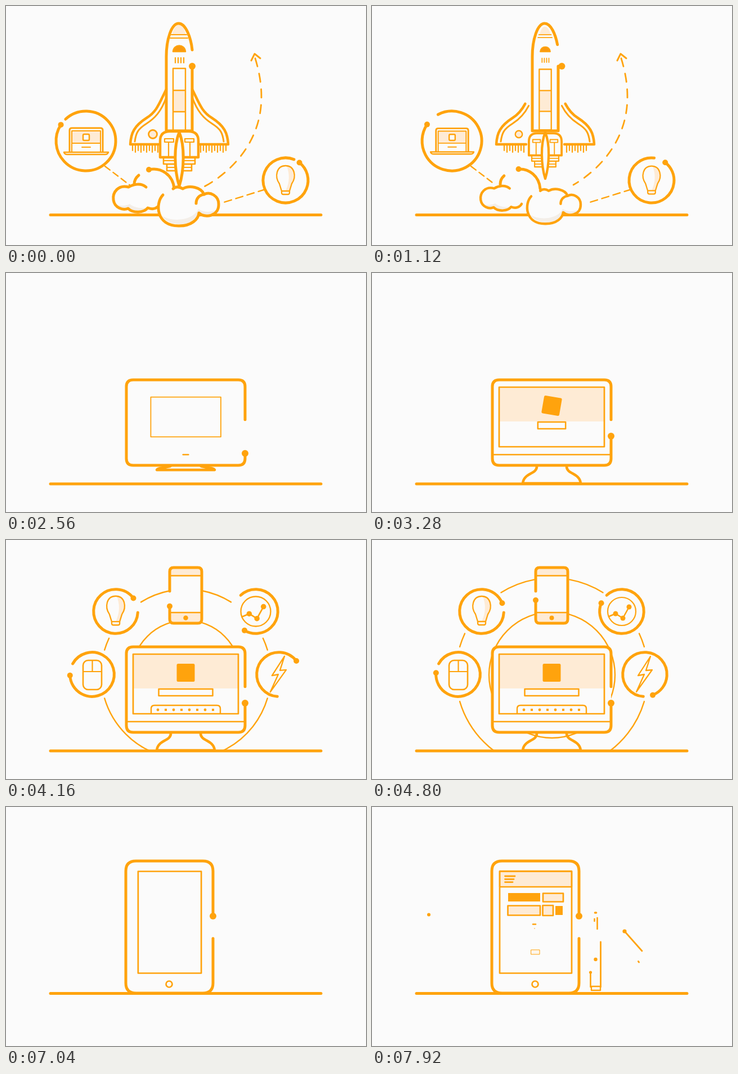
An HTML page with a canvas that plays this animation: 640 px wide and 425 px high, repeating every 8000 ms.

```html
<!DOCTYPE html>
<html lang="en">
<head>
<meta charset="utf-8">
<title>Launch line animation</title>
<style>
html,body{margin:0;width:100%;height:100%;overflow:hidden;background:#fbfbfb}
canvas{display:block;width:640px;height:425px}
</style>
</head>
<body>
<canvas id="stage"></canvas>
<script>
const LOOP = 8000, INK = '#ffa30d', PALE = '#feebd5', PAPER = '#fbfbfb', SHADE = '#f3eee8';
const cv = document.getElementById('stage'), c = cv.getContext('2d');
const dpr = window.devicePixelRatio || 1;
cv.width = 640 * dpr;
cv.height = 425 * dpr;

// ---- timing ----
const ease = {
  io: p => p < .5 ? 2 * p * p : 1 - 2 * (1 - p) ** 2,
  in: p => p * p,
  out: p => 1 - (1 - p) ** 2,
  back: p => 1 + 2.4 * (p - 1) ** 3 + 1.4 * (p - 1) ** 2
};
let now = 0;
// steps: [time, value, easing into this step]
function key(...steps) {
  if (now <= steps[0][0]) return steps[0][1];
  for (let i = 1; i < steps.length; i++) {
    const [t0, v0] = steps[i - 1], [t1, v1, e = 'io'] = steps[i];
    if (now < t1) return v0 + (v1 - v0) * ease[e]((now - t0) / (t1 - t0));
  }
  return steps[steps.length - 1][1];
}
const pop = (t, d = 300) => key([t, 0], [t + d, 1, 'back']);

// ---- drawing helpers ----
const paths = {};
function geo(d) {
  if (!paths[d]) {
    const el = document.createElementNS('http://www.w3.org/2000/svg', 'path');
    el.setAttribute('d', d);
    paths[d] = { el, p: new Path2D(d), len: el.getTotalLength() };
  }
  return paths[d];
}
const len = d => geo(d).len;

function paint(p, w, fill) {
  if (fill) { c.fillStyle = fill; c.fill(p); }
  if (w) { c.lineWidth = w; c.stroke(p); }
}
const line = (d, w, fill) => paint(geo(d).p, w, fill);
function trim(d, a, b, w) {
  if (b - a < .1) return;
  c.setLineDash([b - a, 1e5]);
  c.lineDashOffset = -a;
  line(d, w);
  c.setLineDash([]);
}
function dashes(d, b, on, off, w) {
  for (let s = 0; s < b; s += on + off) trim(d, s, Math.min(s + on, b), w);
}
function circle(x, y, r, w, fill) {
  if (r <= 0) return;
  const p = new Path2D();
  p.arc(x, y, r, 0, 7);
  paint(p, w, fill);
}
const dot = (x, y, r) => circle(x, y, r, 0, INK);
function box(x0, y0, x1, y1, w, fill, r = 0) {
  const p = new Path2D();
  p.roundRect(x0, y0, x1 - x0, y1 - y0, r);
  paint(p, w, fill);
}
function at(x, y, sx, draw, sy = sx, rot = 0) {
  if (sx < .01 || sy < .01) return;
  c.save();
  c.translate(x, y);
  c.rotate(rot);
  c.scale(sx, sy);
  c.translate(-x, -y);
  draw();
  c.restore();
}
function ring(x, y, r, from, to, w = 5) {
  if (Math.abs(to - from) < 1) return;
  const k = Math.PI / 180;
  c.beginPath();
  c.arc(x, y, r, from * k, to * k, to < from);
  c.lineWidth = w;
  c.stroke();
}
function orbit(x, y, r, from, to) {
  if (Math.abs(to - from) < 1) return;
  ring(x, y, r, from, to);
  const a = to * Math.PI / 180;
  dot(x + r * Math.cos(a), y + r * Math.sin(a), 5);
}

// ---- the one long line: rocket hull, monitor, tablet ----
const hull = 'M331 78C329 58 320 31 307 31C294 31 285 60 285 90V222H331';
const hullEnd = hull + 'V107';
const bend = hullEnd + 'H368V261H380';
const toMonitor = bend + 'H425';
const monitor = toMonitor + 'V202Q425 190 413 190H226Q214 190 214 202V330Q214 342 226 342H413Q425 342 425 330V290';
const toTablet = monitor + 'V233H368';
const tablet = toTablet + 'V313Q368 331 350 331H231Q213 331 213 313V114Q213 96 231 96H350Q368 96 368 114V194';

function longLine() {
  const head = key([1000, len(hullEnd)], [1680, len(bend), 'in'], [2790, len(monitor), 'out'],
    [5840, len(monitor)], [6900, len(tablet)]);
  const tail = key([1000, 0], [1680, len(hull) + 4, 'in'], [2500, len(toMonitor), 'out'],
    [5840, len(toMonitor)], [6760, len(toTablet)]);
  trim(tablet, tail, head, 5);
  const p = geo(tablet).el.getPointAtLength(head);
  dot(p.x, p.y, 6);
}

function ground() {
  const y = key([1840, 371.5], [2400, 375], [5800, 375], [6480, 331.5]);
  line(`M79 ${y.toFixed(1)}H560`, 5);
}

// ---- icons ----
function bulb() {
  line('M497 284C513 284 517 303 508 316L504 329H490L486 316C477 303 481 284 497 284', 0, PAPER);
  line('M499 284C513 285 517 303 508 316L504 329H497C505 312 504 298 499 284', 0, PALE);
  line('M490 329L486 316C477 303 481 284 497 284C513 284 517 303 508 316L504 329Z', 2.3);
  line('M490 329V332Q490 335 493 335H501Q504 335 504 332V329', 2.3);
}
function laptop() {
  box(117, 221, 168, 244, 0, PALE);
  line('M113 259V221Q113 217 117 217H168Q172 217 172 221V259', 3);
  line('M117 259V222H168V259M117 244H168M135 251H150', 2);
  box(137, 228, 148, 239, 2.5, PAPER, 2);
  line('M103 260H182Q181 264 176 264H109Q104 264 103 260Z', 2.5);
}
function mouse() {
  box(137, 214, 170, 266, 2.6, null, 9);
  line('M137 234H170M153.5 214V234', 2.2);
}
function chart() {
  circle(444, 127, 25, 2.2);
  line('M421 136L433 131L446 139L457 119', 2.5);
  dot(433, 131, 4.5);
  dot(446, 139, 4.5);
  dot(457, 119, 4.5);
}
const bolt = () => line('M495 207L473 241L484 239L470 270L498 231L487 232Z', 2.3);

// ---- rocket scene ----
const wing = 'M285 148C272 174 268 188 250 199C228 213 222 226 221 246H274';
const rib = 'M285 162C276 188 264 200 250 209C234 219 231 226 229 241';
const swirl = 'M299 325C297 300 275 286 254 291';
const route = 'M443 93C450 116 454 138 454 160C455 245 395 300 347 324';

function halfWing(left) {
  const out = key([960, 0], [1520, 1]);
  for (const [d, w] of [[wing, 4.5], [rib, 3]]) trim(d, len(d) * out, len(d), w);
  const n = Math.round(10 * (1 - out));
  for (let i = 0; i < n; i++) line(`M${270 - i * 5} 248V${i % 2 ? 257 : 260}`, 2.2);
  if (left) at(261, 228, 1 - out, () => circle(261, 228, 7.5, 2.8, PALE));
}
function engine() {
  box(286, 281, 330, 293, 2.6, PAPER);
  box(280, 269, 336, 281, 2.6, PAPER);
  line('M274 269V240Q274 223 291 223H325Q342 223 342 240V269Z', 4.5, PAPER);
  line('M282 236H298V242H282ZM318 236H334V242H318ZM289 242V269M327 242V269M281 275H335M287 287H329', 2.2);
}
function cloudLeft() {
  line('M250 322C240 314 226 317 218 322C200 317 189 331 191 345C193 359 208 364 217 360C226 369 245 368 252 359C262 363 270 359 273 353L285 335Z', 0, PAPER);
  line('M196 353C204 363 212 361 217 359C226 368 245 367 252 359C240 360 228 359 220 352C212 356 204 356 196 353', 0, SHADE);
  line('M249 322C240 314 226 317 218 322C200 317 189 331 191 345C193 359 208 364 217 360C226 369 245 368 252 359C262 363 270 359 273 353', 5);
}
function cloudRight() {
  const edge = 'M279 336C265 350 266 392 308 391C330 391 342 379 343 368C353 378 379 374 378 352C378 338 363 329 352 335C347 322 326 318 314 325C308 321 302 321 297 325';
  line(edge, 0, PAPER);
  line('M277 373C286 390 330 398 342 368C352 377 371 374 376 361C365 368 350 367 342 361C334 380 298 386 277 373', 0, SHADE);
  line(edge, 5);
  line('M338 351C338 342 344 336 352 335', 5);
}
function rocketBack() {
  const out = key([960, 0], [1680, 1, 'in']);
  dashes(route, len(route) + (16 - len(route)) * out - key([1680, 0], [1840, 16]), 15, 13, 2.8);
  at(442, 88, key([1840, 1], [2100, 0]), () => line('M436 97L442 85L452 93', 3));
  const link = 'M461 326L381 351', cord = 'M176 285L222 320';
  dashes(link, len(link) + (9 - len(link)) * out - key([1680, 0], [1800, 9]), 13, 8, 2.4);
  dashes(cord, len(cord) * (1 - key([960, 0], [1500, 1])), 11, 7, 2.4);
}
function rocketBody() {
  const gone = key([960, 1], [1480, 0]);
  halfWing(true);
  at(308, 0, 1, () => {
    c.translate(616, 0);
    c.scale(-1, 1);
    halfWing(false);
  });
  at(308, 52, gone, () => {
    line('M295 51C299 38 303 33 307 33C312 33 317 39 320 51Z', 0, PALE);
    line('M294 51H321M292 57H323', 2.2);
  });
  at(308, 82, gone, () => line('M297 81C298 67 318 67 319 81Z', 2.5, '#f99a10'));
  at(308, 97, gone, () => line('M301 92V101M306 92V101M311 92V101M316 92V101', 2.2));
  at(308, 166, key([1000, 1], [1740, 0, 'in']), () => {
    box(297, 150, 319, 188, 0, PALE);
    line('M297 111H319V222H297ZM297 150H319M297 188H319', 2.4);
  });
}
function rocketFront() {
  const s = key([960, 1], [1560, 0]), beat = Math.sin(now / 130);
  at(308, 246, s, engine);
  at(308, 224, s, () => line('M308 225C298 248 299 292 308 320C317 292 318 248 308 225Z', 5, PAPER), s * (1 + .015 * beat));
  const puff = key([980, 1], [1600, 0]), breath = 1 + .012 * Math.sin(now / 210);
  trim(swirl, 0, len(swirl) * puff, 5);
  if (puff > .02) {
    const p = geo(swirl).el.getPointAtLength(len(swirl) * puff);
    dot(p.x, p.y, 5 * Math.min(1, puff * 2));
  }
  trim('M228 317C228 310 231 305 236 301', 0, 19 * puff, 5);
  at(211, 343, puff * breath, cloudLeft);
  at(315, 358, puff * breath, cloudRight);
  if (now > 1400) circle(211, 343, key([1400, 14], [1680, 8.5], [1790, 0]), 2.4);
}
function rocketBadges() {
  const s = key([1000, 1], [1740, 0, 'in']);
  const tail = key([960, 0], [1680, 307, 'in'], [1820, 361, 'out']);
  const head = key([960, 0], [1680, 14, 'in'], [1820, 15]);
  orbit(142, 240, 53, 227 + tail, 573 + head);
  orbit(497, 310, 40, -68 - tail, -412 - head);
  at(142, 239, s, laptop);
  at(497, 309, s, bulb);
}

// ---- monitor scene ----
const shrink = () => key([5320, 1], [6300, 0]);
const phone = 'M291 91V56Q291 49 298 49H341Q348 49 348 56V141Q348 148 341 148H298Q291 148 291 141V107';
const gaps = [[0, 16.5], [180, 16.5], [221.5, 16.5], [270, 10.5], [318.5, 16.5], [360, 16.5]];

function halos() {
  const grow = key([3700, 0], [4400, 1, 'out']), fade = key([5760, 1], [6240, 0, 'in']);
  if (grow * fade < .02) return;
  const open = key([5300, 1], [5740, 0]);
  const w = key([5300, 2.4], [5760, 3.4]);
  c.save();
  c.beginPath();
  c.rect(0, 0, 640, 375);
  c.clip();
  const big = key([5280, 171], [5760, 219, 'out']) * grow * fade;
  for (let i = 1; i < gaps.length; i++) {
    const [a, ha] = gaps[i - 1], [b, hb] = gaps[i];
    ring(320, 238.5, big, a + ha * open, b - hb * open, w);
  }
  circle(320, key([4800, 240], [5760, 237.5]), key([4400, 110], [4800, 112], [5760, 136]) * grow * fade, w);
  c.restore();
}
function stand() {
  const k = key([2500, 0], [2950, 1, 'out'], [5320, 1], [5760, .3], [5960, 0]);
  if (k < .02) return;
  const y = v => (342 + (v - 342) * k).toFixed(1);
  paint(new Path2D(`M293 ${y(344)}C293 ${y(358)} 270 ${y(355)} 268 ${y(374)}H371C369 ${y(355)} 346 ${y(358)} 346 ${y(344)}`), 4.6);
}
function keyboard() {
  const dy = key([3500, 18], [3900, 0, 'out'], [5320, 0], [5760, 7], [6100, 18]);
  if (dy > 17) return;
  c.save();
  c.beginPath();
  c.rect(227, 204, 185, 105);
  c.clip();
  c.translate(0, dy);
  line('M258 312V300Q258 294 264 294H375Q381 294 381 300V312', 2.4);
  for (let i = 0; i < 8; i++) {
    const x = 270 + i * 14;
    if (i % 2) box(x - 2, 300, x + 2, 304, 0, INK);
    else dot(x, 302, 2.4);
  }
  c.restore();
}
function screen() {
  if (now > 2600 && now < 6000) box(214, 190, 425, 342, 0, PAPER, 12);
  const k = key([2350, 0], [2850, 1, 'out'], [5860, 1], [6320, 0]);
  at(320, 256, k, () => {
    const h = key([2700, 0], [3120, 61]);
    box(226, 203, 413, 203 + h, 0, PALE);
    box(226, 203, 413, 309, 2.7);
  });
  const chin = 105 * key([2500, 0], [2900, 1], [5840, 1], [6240, 0]);
  if (chin > 1) line(`M${319.5 - chin} 323H${319.5 + chin}`, 2.5);
  const out = shrink();
  at(319.5, 236, key([2900, 0], [3200, 1, 'back']) * out, () => box(303.5, 220, 335.5, 252, 0, INK, 2.5),
    undefined, key([2900, -1.6], [3280, .17], [3460, 0]));
  const wide = key([3080, 0], [3280, .51], [3520, 1, 'out']);
  at(319.5, 271, out, () => {
    if (wide > .01) box(319.5 - 48 * wide, 265, 319.5 + 48 * wide, 277, 2.5, PAPER);
  });
  keyboard();
}
function phoneScene() {
  const L = len(phone);
  const b = L * key([3600, 0], [4250, 1]);
  const a = key([5320, 0], [5760, 79, 'in'], [6300, L]);
  if (now > 3900 && now < 5900) box(291, 49, 348, 148, 0, PAPER, 7);
  const s = pop(3950, 350) * shrink();
  at(319.5, 58, s, () => box(293, 51, 346, 63, 0, PALE));
  at(319.5, 64, s, () => line('M293 63.5H346', 2.4));
  at(319.5, 138, s, () => box(293, 130, 346, 146, 0, PALE));
  at(319.5, 129, s, () => line('M293 129H346', 2.4));
  at(319.5, 138.5, s, () => dot(319.5, 138.5, 4));
  if (b - a < .5) return;
  trim(phone, a, b, 5);
  const p = geo(phone).el.getPointAtLength(b);
  dot(p.x, p.y, 5);
}
function badge(x, y, start, begin, icon, dx = 0, dy = 0) {
  const tail = key([5320, 0], [5760, 108, 'in'], [6300, 355, 'out']);
  const head = key([begin, 0], [begin + 800, 335], [5320, 335], [5760, 347], [6300, 355]);
  orbit(x, y, 39.3, start + tail, start + head);
  at(x, y, pop(begin + 300, 420) * shrink(), () => {
    c.translate(dx, dy);
    icon();
  });
}
function monitorScene() {
  halos();
  stand();
  screen();
  phoneScene();
  badge(153, 239, 209, 3440, mouse);
  badge(195, 127, 3, 3480, bulb, -302, -184);
  badge(444, 127, 227, 3640, chart);
  badge(485, 239, 94, 3680, bolt);
}

// ---- tablet scene ----
function stretch(x0, y0, x1, y1, t, w, fill) {
  at((x0 + x1) / 2, (y0 + y1) / 2, pop(t, 260), () => box(x0, y0, x1, y1, w, fill));
}
function draw(x0, y0, x1, y1, t, w = 2.6, d = 260) {
  const k = key([t, 0], [t + d, 1, 'out']);
  if (k > .01) line(`M${x0} ${y0}L${x0 + (x1 - x0) * k} ${y0 + (y1 - y0) * k}`, w);
}
function tabletScene() {
  const wide = 64 * key([6700, 0], [7040, .875], [7160, 1, 'out']);
  const bar = key([7120, 0], [7400, 28, 'out']);
  if (wide > 1) {
    if (bar > 1) box(291 - wide, 114, 291 + wide, 114 + bar, 2.4, PALE);
    box(291 - wide, 114.5, 291 + wide, 295.5, 2.7);
  }
  at(290, 315, pop(6720), () => circle(290, 315, 5.5, 2.7));
  [254, 252, 250].forEach((x, i) => draw(236.5, 123 + i * 5.3, x, 123 + i * 5.3, 7320 + i * 60, 2.8));
  stretch(242, 153, 299, 168, 7420, 0, INK);
  stretch(304, 153.5, 340, 168.5, 7500, 2.7, PALE);
  stretch(241.5, 175.5, 299, 192.5, 7560, 2.7, PALE);
  stretch(303.5, 175, 322, 193, 7620, 2.7, PALE);
  stretch(326, 176, 339, 192, 7660, 0, INK);
  draw(286, 208.5, 291, 208.5, 7780, 2.6, 120);
  at(289, 216, pop(7840, 80), () => dot(289, 216, .8));
  at(290.5, 258, pop(7740, 180), () => box(283, 254, 298, 262, 1, '#fdf6ec'));

  at(101, 191.5, pop(7700, 200), () => dot(101, 191.5, 3));
  stretch(390, 319, 406, 326, 7520, 2.4, PAPER);
  draw(406.5, 320, 406.5, 240, 7560, 2.8, 350);
  draw(388.5, 320, 388.5, 294, 7640, 2.6, 270);
  at(388.5, 294, pop(7760, 140), () => dot(388.5, 294, 2.6));
  at(397.5, 271, pop(7700, 200), () => dot(397.5, 271, 3.2));
  draw(400.5, 217, 400.5, 197, 7700, 2.6, 210);
  draw(395.5, 203, 395.5, 199, 7780, 2.6, 130);
  draw(396.5, 188, 398.5, 188, 7800, 3.6, 110);
  draw(480, 256, 449, 221, 7640, 2.8, 270);
  at(449, 221, pop(7740, 160), () => dot(449, 221, 3.6));
  draw(473.5, 274.5, 474.5, 276, 7800, 3, 110);
}

function frame(time) {
  now = time % LOOP;
  c.setTransform(dpr, 0, 0, dpr, 0, 0);
  c.fillStyle = PAPER;
  c.fillRect(0, 0, 640, 425);
  c.strokeStyle = INK;
  c.lineCap = c.lineJoin = 'round';
  if (now < 2200) rocketBack();
  if (now > 2300 && now < 6400) monitorScene();
  ground();
  if (now < 2200) rocketBody();
  longLine();
  if (now < 2200) {
    rocketFront();
    rocketBadges();
  }
  if (now > 6600) tabletScene();
}

const begin = performance.now();
function tick() {
  frame(performance.now() - begin);
  requestAnimationFrame(tick);
}
tick();
</script>
</body>
</html>
```
